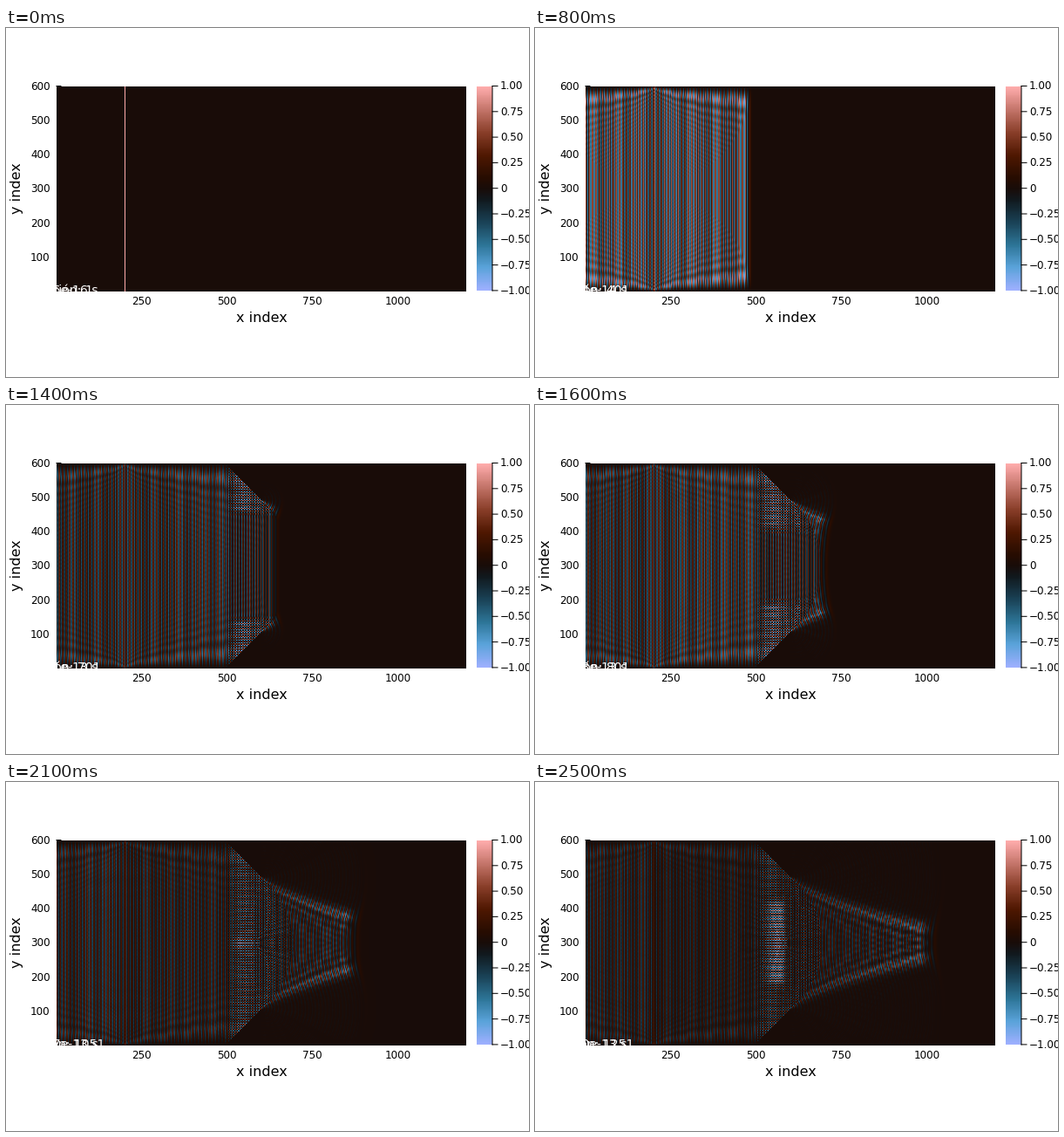
These frames come from a looping animation (600x400 px, 2.6 s). A matplotlib script:

```python
import numpy as np
import matplotlib.pyplot as plt
from matplotlib.animation import FuncAnimation
from matplotlib.colors import LinearSegmentedColormap

W, H, DPI = 600, 400, 100
PT = 72 / DPI
NX, NY = 1200, 600
FRAMES, STRIDE = 26, 50
COURANT = 1 / np.sqrt(2)
WAVELENGTH = 10
SOURCE = 200
HORN_START, HORN_END, HORN_HALF = 500, 600, 292
LENS_CENTER, LENS_RADIUS, LENS_INDEX = 440, 250, 1.3
TIME_STEP = 1.6e-16

plt.rcParams["font.family"] = "DejaVu Sans"

BERLIN = LinearSegmentedColormap.from_list("berlin_like", [
    (0, "#9EB0FF"), (1 / 9, "#5AA3DA"), (2 / 9, "#2D7597"), (3 / 9, "#1A4256"),
    (4 / 9, "#11191E"), (0.5, "#190C09"), (5 / 9, "#280D01"), (6 / 9, "#501802"),
    (7 / 9, "#8A3F2A"), (8 / 9, "#C4756A"), (1, "#FFACAC")], N=256)


def medium():
    """Squared Courant number per cell: a mirror-walled glass horn ending in a round lens."""
    y, x = np.mgrid[0:NY // 2, 0:NX]
    horn = (x >= HORN_START) & (x <= HORN_END)
    wall = horn & (y > HORN_HALF - (x - HORN_START))
    dome = (x > HORN_END) & ((x - LENS_CENTER) ** 2 + (y + 0.5) ** 2 <= LENS_RADIUS ** 2)
    gain = COURANT ** 2 / np.where(horn | dome, LENS_INDEX ** 2, 1)
    gain[wall] = 0
    return gain.astype(np.float32)


def simulate():
    """Plane wave running into the lens; returns the upper half for each frame."""
    gain = medium()
    # Row 0 is a ghost row that mirrors the field about the optical axis.
    now = np.zeros((NY // 2 + 1, NX), np.float32)
    old = np.zeros_like(now)
    mur = np.float32((COURANT - 1) / (COURANT + 1))
    omega = 2 * np.pi * COURANT / WAVELENGTH
    shots = []

    for n in range(1, STRIDE * (FRAMES - 1) + 2):
        end = min(NX, int(SOURCE + 12 + 0.74 * n))
        u = now[:, :end]
        inner = u[1:-1, 1:-1]
        lap = u[2:, 1:-1] + u[:-2, 1:-1]
        lap += u[1:-1, 2:]
        lap += u[1:-1, :-2]
        lap -= 4 * inner
        lap *= gain[:-1, 1:end - 1]
        lap += 2 * inner
        lap -= old[1:-1, 1:end - 1]

        # The older buffer becomes the new field; its edges follow the Mur condition.
        new = old
        new[1:-1, 1:end - 1] = lap
        new[1:-1, SOURCE] += np.sin(omega * n) - np.sin(omega * (n - 1))
        new[:, 0] = now[:, 1] + mur * (new[:, 1] - now[:, 0])
        if end == NX:
            new[:, -1] = now[:, -2] + mur * (new[:, -2] - now[:, -1])
        new[-1] = now[-2] + mur * (new[-2] - now[-1])
        new[0] = new[1]
        old, now = now, new

        if n % STRIDE == 1:
            shots.append(now[1:] / np.abs(now).max())
    return shots


def pixel_axes(left, top, right, bottom):
    ax = fig.add_axes([left / W, 1 - bottom / H, (right - left) / W, (bottom - top) / H])
    ax.set_xticks([])
    ax.set_yticks([])
    for spine in ax.spines.values():
        spine.set_visible(False)
    return ax


def label(x, y, text, size=12, ha="center", **kw):
    fig.text(x / W, 1 - y / H, text, fontsize=size * PT, ha=ha,
             va=kw.pop("va", "center_baseline"), **kw)


def line(xs, ys):
    fig.add_artist(plt.Line2D([x / W for x in xs], [1 - y / H for y in ys], color="black",
                              lw=PT, snap=False, transform=fig.transFigure))


fields = simulate()
fig = plt.figure(figsize=(W / DPI, H / DPI), dpi=DPI, facecolor="white")

ax = pixel_axes(58, 67, 528, 302)
image = ax.imshow(np.zeros((NY, NX)), cmap=BERLIN, vmin=-1, vmax=1, origin="lower",
                  extent=(0.5, NX + 0.5, 0.5, NY + 0.5), aspect="auto",
                  interpolation="nearest")
note_style = dict(color="white", fontsize=14 * PT, ha="center", va="center", clip_on=True)
step_note = ax.text(5, 3, "", **note_style)
time_note = ax.text(5, 3, "", **note_style)

line((58, 63), (66.5, 66.5))
for value in (250, 500, 750, 1000):
    label(58 + (value - 0.5) * 470 / NX, 312, str(value))
for value in range(100, 601, 100):
    label(50.5, 300.5 - (value - 0.5) * 234.5 / NY, str(value), ha="right")
label(293.5, 331, "x index", 16)
label(12, 184, "y index", 16, rotation=90, va="center")

bar = pixel_axes(540, 67, 558, 301)
bar.imshow(np.linspace(-1, 1, 256)[:, None], cmap=BERLIN, origin="lower", aspect="auto")
line((558, 558), (66.5, 301))
for k in range(-4, 5):
    y = 183.7 - k * 29.3
    line((558, 564), (y, y))
    label(567, y - 1, f"{k / 4:.2f}".replace("-", "\u2212") if k else "0", ha="left")


def draw(frame):
    step = 1 + STRIDE * frame
    upper = fields[frame]
    image.set_data(np.vstack([upper[::-1], upper]))
    step_note.set_text(f"Iteración: {step}")
    time_note.set_text(f"t = {step * TIME_STEP:.1e} s")
    return image, step_note, time_note


animation = FuncAnimation(fig, draw, frames=FRAMES, interval=100, repeat=True,
                          repeat_delay=0, blit=False)
plt.show()
```
